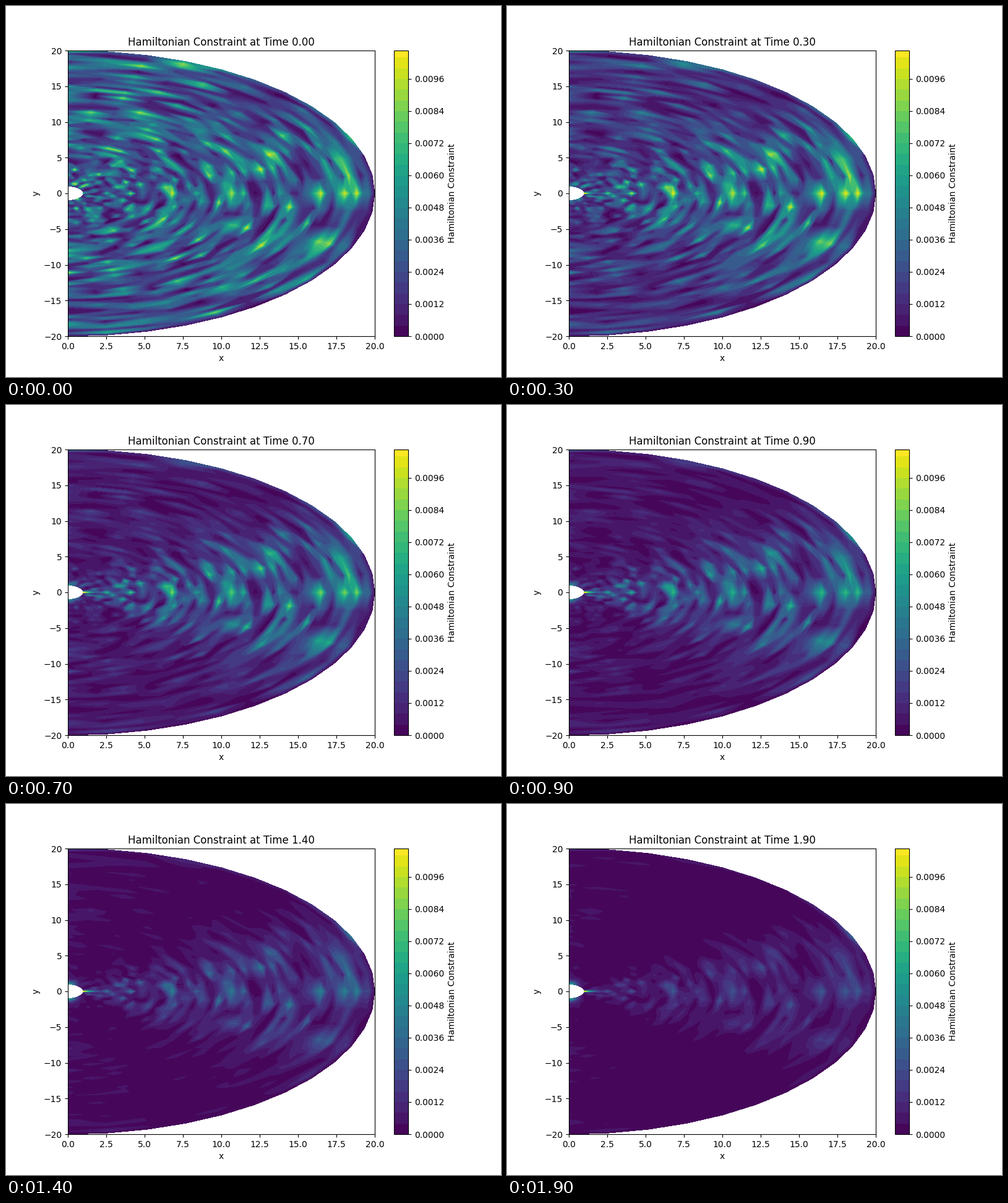
These frames come from a looping animation (800x600 px, 2 s). A matplotlib script:

```python
import numpy as np
import matplotlib.pyplot as plt
from matplotlib.animation import FuncAnimation

FRAMES, STEP = 20, 0.1
TOP = 0.01066
LEVELS = np.arange(28) * 0.0004

# Polar half-disc grid
radius = np.linspace(1, 20, 50)
angle = np.linspace(-90, 90, 25)
R, A = np.meshgrid(radius, angle)
T = np.radians(A)
X, Y = R * np.cos(T), R * np.sin(T)

# Brightest spots as (radius, angle)
HOT = [(6.8, 0), (10.6, 0), (16.5, 0), (18.06, 0), (18.84, 0), (14.5, -7.5),
       (12.6, -22.5), (14.6, -30), (17.8, -22.5), (13, 15), (14.2, 22.5)]


def initial_field():
    rng = np.random.default_rng(7)
    field = np.minimum(np.abs(rng.normal(0, 0.0038, R.shape)), 0.009)
    field[angle <= 15, -1] *= 0.1
    for r, a in HOT:
        weight = np.exp(-((R - r) / 0.35) ** 2 - ((A - a) / 4) ** 2)
        field += weight * (0.0098 - field)
    return field


START = initial_field()
EQUATOR = np.exp(-np.abs(A / 44) ** 3)
POLE = np.abs(np.sin(T))
EDGE = 1 - 0.45 * np.exp(-(20 - R) / 0.4)


def field_at(t):
    grow = 1 - np.exp(-2 * t)
    # The equator holds its strength for a while, the rest fades at once
    slow = 0.04 * min(t / 0.3, 1) - 0.9 * max(t - 0.5, 0)
    fade = np.exp(EDGE * (EQUATOR * slow - (1 - EQUATOR) * 2.2 * t))
    rest = 0.08 * POLE ** 20 * grow
    reach = 0.4 + 0.8 * np.exp(-t)
    spike = 0.0105 * np.exp(-(R - 1) / reach - (A / 4) ** 2) * grow
    caps = 0.006 * np.exp(-(R - 1) / 0.35) * POLE ** 6 * grow
    return np.clip(START * (fade + rest) + spike + caps, 0, 0.01065)


def draw_field(t):
    return ax.contourf(X, Y, field_at(t), levels=LEVELS, vmin=0, vmax=TOP,
                       cmap="viridis")


fig, ax = plt.subplots(figsize=(8, 6), dpi=100)
shown = [draw_field(0)]
bar = fig.colorbar(shown[0], ax=ax, ticks=np.arange(9) * 0.0012, format="%.4f")
bar.set_label("Hamiltonian Constraint")
bar.minorticks_off()
bar.ax.set_ylim(0, TOP)
ax.set(xlim=(0, 20), ylim=(-20, 20), xlabel="x", ylabel="y")
title = ax.set_title("Hamiltonian Constraint at Time 0.00")


def update(i):
    t = i * STEP
    shown.pop().remove()
    shown.append(draw_field(t))
    title.set_text(f"Hamiltonian Constraint at Time {t:.2f}")
    return shown[0], title


anim = FuncAnimation(fig, update, frames=FRAMES, interval=1000 * STEP,
                     init_func=lambda: update(0), repeat=True, blit=False)
plt.show()
```
